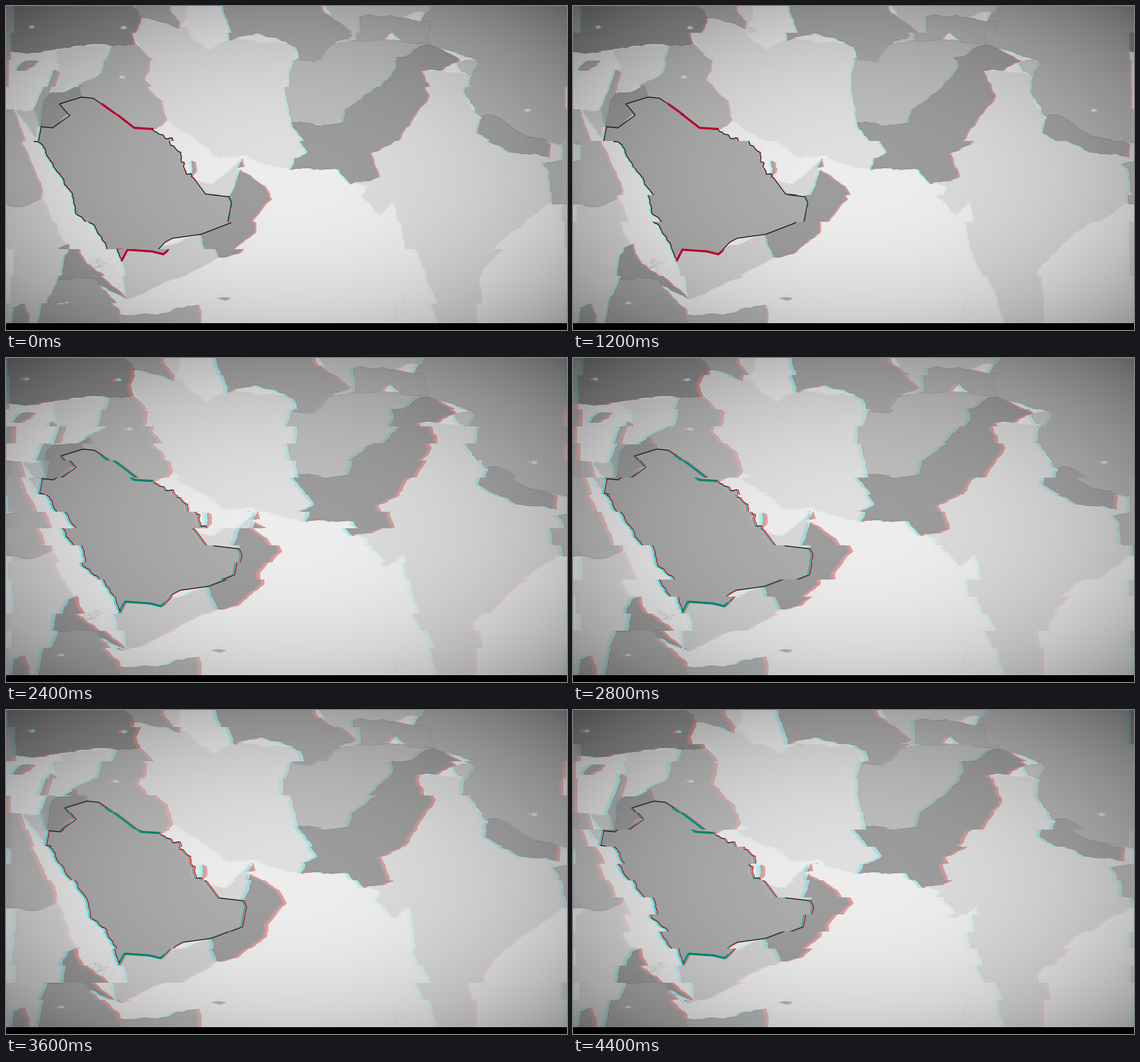
Animation of 984 by 569 pixels, one loop 4.8 s. Source, as a matplotlib script:

```python
import numpy as np
import matplotlib.pyplot as plt
from matplotlib.animation import FuncAnimation

W, H, DPI = 984, 569, 100
BAR_TOP = 557
STILL_TOP = 505
PX = 72 / DPI
STEPS = 12
SEA = 238
rng = np.random.default_rng(4)

fig = plt.figure(figsize=(W / DPI, H / DPI), dpi=DPI, facecolor="white")
ax = fig.add_axes([0, 0, 1, 1])


def reset_axes():
    ax.clear()
    ax.set_xlim(0, W)
    ax.set_ylim(H, 0)
    ax.axis("off")


def snapshot():
    fig.canvas.draw()
    return np.asarray(fig.canvas.buffer_rgba())[:H, :W, :3].astype(float)


def points(*xy):
    return np.array(xy, float).reshape(-1, 2)


def rough(pts, amp=0.07):
    """Coastline detail: displace midpoints until the steps are short."""
    for _ in range(5):
        a, b = pts[:-1], pts[1:]
        size = np.hypot(*(b - a).T)[:, None]
        shake = np.clip(rng.normal(0, amp, a.shape), -2 * amp, 2 * amp)
        mid = (a + b) / 2 + shake * np.minimum(size, 30)
        keep = size[:, 0] > 4
        pts = np.insert(pts, np.flatnonzero(keep) + 1, mid[keep], axis=0)
    return pts


def land(tone, *xy, amp=0.07):
    pts = points(*xy)
    pts = rough(np.vstack([pts, pts[:1]]), amp)
    shade = (tone / 255,) * 3
    edge = (tone / 255 * 0.82,) * 3 if tone < 205 else "none"
    ax.fill(pts[:, 0], pts[:, 1], fc=shade, ec=edge, lw=0.8 * PX)


# Arabian outline, in drawing order round the peninsula
NORTH = points(135, 160, 155, 162, 170, 172)
NORTH_HOT = points(170, 172, 195, 190, 226, 214, 258, 216)
GULF = rough(points(258, 216, 278, 228, 293, 232, 315, 257, 320, 285, 337, 303),
             0.14)
EAST = points(337, 303, 357, 330, 400, 335, 405, 345, 398, 381, 346, 401,
              296, 408, 283, 415, 269, 430)
SOUTH_HOT = points(269, 430, 262, 436, 242, 431, 199, 428, 189, 447)
RED_SEA = rough(points(189, 447, 166, 400, 132, 365, 120, 325, 93, 285,
                       66, 239, 58, 238))
WEST = points(58, 238, 63, 212, 83, 214, 113, 192, 96, 172, 135, 160)
OUTLINE = [NORTH, NORTH_HOT, GULF, EAST, SOUTH_HOT, RED_SEA, WEST]


def draw_asia():
    # plateau in the north-east, then the steppe
    land(182, 735, -20, 1010, -20, 1010, 265, 900, 222, 828, 190, 806, 150,
         822, 95, 742, 71, 690, 69)
    land(205, 533, -20, 740, -20, 725, 12, 640, 24, 620, 66, 575, 66)
    # subcontinent
    land(220, 600, 300, 640, 318, 632, 335, 665, 367, 690, 345, 704, 427,
         737, 495, 770, 600, 826, 600, 822, 465, 865, 420, 960, 348, 1010, 335,
         1010, 245, 850, 225, 828, 190, 806, 150, 808, 122, 758, 113, 700, 113,
         640, 250, amp=0.05)
    land(204, 788, 96, 815, 91, 825, 101, 808, 122, amp=0.1)
    land(165, 838, 192, 828, 222, 895, 257, 961, 266, 963, 243, 905, 224,
         858, 193)
    land(185, 950, 277, 1010, 274, 1010, 346, 968, 348, 960, 290)
    # plateau between the two seas
    land(224, 214, -20, 400, -20, 400, 58, 500, 70, 515, 188, 540, 257,
         507, 288, 430, 262, 385, 268, 335, 235, 283, 200, 238, 130, 249, 95,
         212, 45)
    land(SEA, 308, -20, 294, 35, 345, 77, 384, 62, 366, 2, 366, -20)
    land(175, 196, -20, 262, -20, 290, 28, 288, 40, 222, 20)
    land(172, 366, -20, 366, 2, 384, 61, 435, 48, 500, 72, 515, 102, 538, 98,
         562, 68, 598, 52, 540, 5, 533, -20)
    land(180, 606, 18, 690, 22, 728, 26, 733, 62, 690, 70, 668, 44, 640, 66,
         608, 68)
    land(190, 503, 92, 538, 98, 562, 68, 665, 60, 735, 66, 690, 100, 660, 140,
         600, 208, 503, 204, 498, 175, 493, 120, amp=0.05)
    land(157, 678, 90, 735, 68, 790, 96, 758, 113, 724, 113, 745, 158,
         690, 236, 648, 258, 662, 300, 612, 313, 590, 286, 507, 288, 515, 268,
         538, 257, 503, 204, 565, 210, 593, 205, 598, 182, 643, 152, 682, 108)


def draw_levant():
    land(184, 167, 62, 218, 66, 249, 95, 238, 130, 276, 168, 283, 200,
         262, 216, 226, 214, 170, 172, 135, 160, 122, 138)
    land(222, 78, 78, 178, 66, 167, 95, 163, 117, 92, 155, 78, 148, 88, 105,
         amp=0.03)
    land(182, 79, 112, 89, 118, 61, 212, 50, 184, 66, 150, amp=0.03)
    land(158, 129, 140, 135, 160, 96, 172, 112, 188, 83, 214, 62, 212, 70, 165,
         82, 152, 105, 152, amp=0.02)
    land(148, -20, -20, 205, -20, 222, 20, 212, 47, 218, 66, 110, 70, 35, 82,
         -20, 74)
    land(178, 14, 112, 20, 104, 52, 97, 30, 113)


def draw_africa():
    land(218, -20, 340, 60, 340, 72, 330, 98, 400, 114, 425, 90, 600, -20, 600,
         amp=0.04)
    land(190, -20, 180, 16, 182, 38, 245, 68, 310, 70, 338, 42, 351, -20, 348,
         amp=0.05)
    land(208, 20, 184, 54, 184, 60, 208, 54, 234)
    land(158, 114, 418, 122, 442, 160, 476, 203, 514, 150, 482, 82, 484,
         98, 425)
    land(172, 82, 479, 150, 479, 200, 535, 205, 600, 40, 600, 74, 500)
    land(172, 2, 575, 14, 530, 32, 523, 50, 575)
    land(184, 198, 542, 260, 542, 338, 525, 336, 600, 200, 600)


def draw_arabia():
    land(210, 269, 427, 346, 401, 361, 441, 300, 475, 202, 515, 189, 447,
         199, 428, amp=0.04)
    land(216, 340, 305, 370, 312, 418, 272, 400, 335, 357, 330, amp=0.03)
    land(157, 418, 288, 463, 318, 475, 340, 442, 378, 442, 398, 398, 433,
         360, 441, 346, 401, 398, 381, 405, 345, 400, 335, 410, 315, amp=0.04)
    land(157, 416, 284, 423, 268, 426, 282, amp=0.03)
    body = np.vstack(OUTLINE)
    ax.fill(body[:, 0], body[:, 1], fc=(173 / 255,) * 3)
    land(166, 333, 300, 334, 272, 341, 275, 341, 292, amp=0.04)


def draw_details():
    for x, y in points(31, 37, 193, 38, 200, 125, 347, 115, 462, 249, 918, 183,
                       98, 522):
        turn = np.linspace(0, 2 * np.pi, 13)
        r = rng.uniform(2, 5, 13)
        ax.fill(x + 1.3 * r * np.cos(turn), y + 0.8 * r * np.sin(turn), fc="0.9")
    land(185, 364, 514, 372, 512, 385, 514, 374, 517)
    specks = rng.normal((148, 455), (11, 8), (60, 2))
    ax.plot(*specks.T, "s", c="0.75", ms=1.5 * PX, mew=0)
    ax.plot(rng.uniform(683, 694, 9), np.linspace(513, 549, 9), "s", c="0.78",
            ms=1.6 * PX, mew=0)


def draw_map():
    reset_axes()
    ax.fill([0, W, W, 0], [0, 0, H, H], fc=(SEA / 255,) * 3)
    for part in (draw_asia, draw_levant, draw_africa, draw_arabia,
                 draw_details):
        part()
    return snapshot()


def draw_mask(paths, width):
    """Coverage of the given paths, 0 to 1."""
    reset_axes()
    for p in paths:
        ax.plot(*p.T, c="black", lw=width * PX, solid_capstyle="round",
                solid_joinstyle="round")
    return 1 - snapshot()[:, :, 0] / 255


base = draw_map()
thin = draw_mask([NORTH, GULF, EAST, RED_SEA, WEST], 1.6)
thick = draw_mask([NORTH_HOT, SOUTH_HOT], 3.8)

yy, xx = np.mgrid[:H, :W]
dist = ((xx - 500) / 492) ** 2 + ((yy - 300) / 285) ** 2
vignette = 1 - 0.14 * dist - 0.04 * dist ** 2


def tear(layer, edges, shifts):
    out = layer.copy()
    for top, end, s in zip(edges[:-1], edges[1:], shifts):
        if top < STILL_TOP:
            out[top:end] = np.roll(layer[top:end], s, axis=1)
    return out


def compose(step):
    """Wide bands with red accents first, narrow bands with teal ones after."""
    late = step >= STEPS // 2
    bands, split, line_split = (19, 8, 3) if late else (12, 4, 1)
    accent = (5, 128, 108) if late else (186, 0, 45)
    edges = np.linspace(0, H, bands + 1).round().astype(int)
    shifts = np.random.default_rng(step).integers(-9, 20, bands)

    image = tear(base, edges, shifts)
    red = image[:, :, 0]
    image[:, :, 0] = (np.roll(red, -split // 2, axis=1)
                      + np.roll(red, -split, axis=1)) / 2
    image *= vignette[:, :, None]
    for mask, color in ((thin, (24, 24, 24)), (thick, accent)):
        mask = tear(mask, edges, shifts)
        for ch, tone in enumerate(color):
            m = np.roll(mask, -line_split, axis=1) if ch == 0 else mask
            image[:, :, ch] += (tone - image[:, :, ch]) * m
    image[BAR_TOP:] = 0
    return np.clip(image, 0, 255).astype(np.uint8)


frames = [compose(step) for step in range(STEPS)]
ax.clear()
ax.axis("off")
picture = ax.imshow(frames[0], aspect="auto", interpolation="nearest")


def update(i):
    picture.set_data(frames[i])
    return [picture]


anim = FuncAnimation(fig, update, frames=STEPS, interval=400,
                     repeat=True, repeat_delay=0)
plt.show()
```
